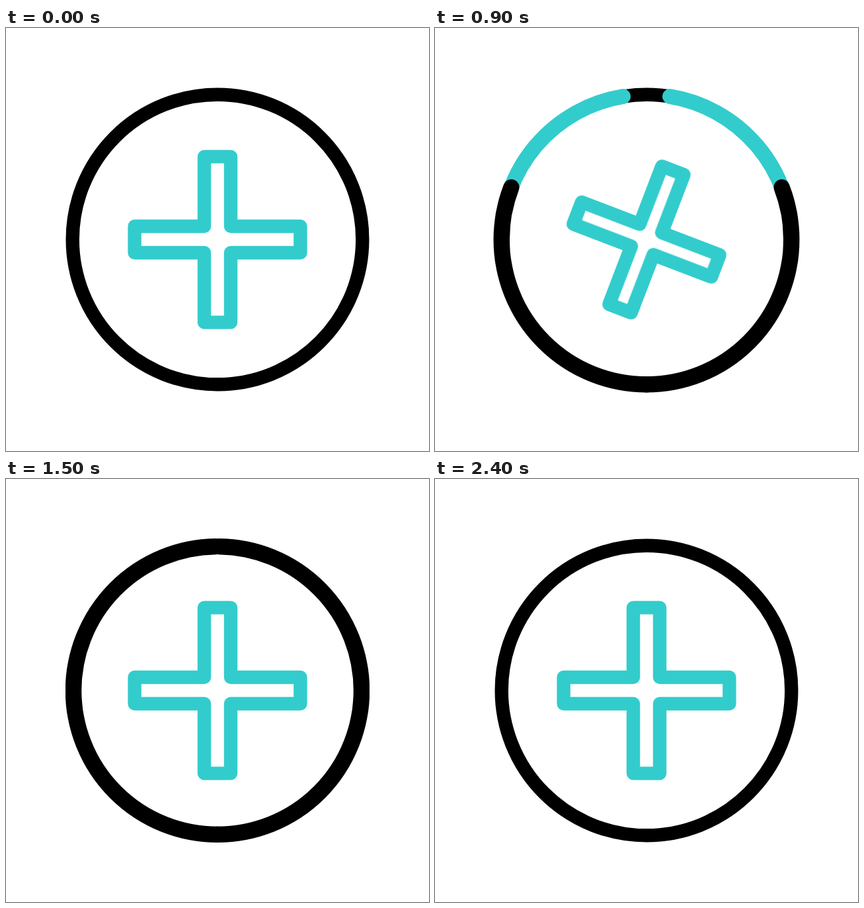
Write an HTML page that moves like this. It is 640 px wide and 640 px high and loops after 2420 ms.

```html
<!DOCTYPE html>
<html lang="en">
<head>
<meta charset="utf-8">
<title>Add</title>
<style>
  html, body { margin: 0; width: 100%; height: 100%; overflow: hidden; background: #fff; }
  svg { display: block; width: 640px; height: 640px; }

  circle, path { fill: none; stroke-linecap: round; stroke-linejoin: round; }
  circle { r: 219.3px; stroke: #000; stroke-width: 20.4; animation: pulse 2420ms infinite; }
  .cyan, .plus { stroke: #33cccc; }

  .cyan {
    stroke-width: 23;
    animation: pulse 2420ms infinite, cyan-grow 2420ms infinite, cyan-show 2420ms step-end infinite;
  }
  .black {
    stroke-width: 24.4;
    animation: pulse 2420ms infinite, black-sweep 2420ms infinite, black-show 2420ms step-end infinite;
  }
  .plus {
    stroke-width: 20.4;
    vector-effect: non-scaling-stroke;
    transform-origin: 0 0;
    animation: bounce 2420ms cubic-bezier(.37, 0, .63, 1) infinite,
               tilt 2420ms cubic-bezier(.37, 0, .63, 1) infinite;
  }

  /* Ring radius: small dip, swell, settle */
  @keyframes pulse {
    0%, 53.7% { r: 219.3px; animation-timing-function: cubic-bezier(.37, 0, .63, 1); }
    59.1% { r: 208.3px; animation-timing-function: cubic-bezier(.25, 0, .25, 1); }
    74.8% { r: 251.8px; animation-timing-function: cubic-bezier(.37, 0, .63, 1); }
    91.2%, 100% { r: 219.3px; }
  }

  /* Half arcs run from the bottom to the top, in degrees */
  @keyframes cyan-grow {
    0%, 2.89% { stroke-dasharray: 0 400; animation-timing-function: cubic-bezier(.333, .667, .667, 1); }
    47.36%, 100% { stroke-dasharray: 180 400; }
  }
  @keyframes cyan-show {
    0% { opacity: 0; }
    2.89% { opacity: 1; }
    61.4%, 100% { opacity: 0; }
  }
  @keyframes black-sweep {
    0%, 22.31% { stroke-dasharray: 0 400; animation-timing-function: cubic-bezier(.333, .667, .667, 1); }
    61.24% { stroke-dasharray: 179.2 400; animation-timing-function: cubic-bezier(.333, 0, .667, 0); }
    97.3%, 100% { stroke-dasharray: 0 400; }
  }
  @keyframes black-show {
    0% { opacity: 0; }
    22.31% { opacity: 1; }
    97.3%, 100% { opacity: 0; }
  }

  @keyframes bounce {
    0% { scale: 1; }
    8.26% { scale: 1.38; }
    28.1% { scale: .785; }
    49.6% { scale: 1.065; }
    57.85%, 100% { scale: 1; }
  }
  @keyframes tilt {
    0%, 4.55% { rotate: 0deg; }
    30.37% { rotate: 25deg; }
    56.2%, 100% { rotate: 0deg; }
  }
</style>
</head>
<body>
<svg viewBox="0 0 640 640">
  <g transform="translate(320 320)">
    <circle/>
    <g transform="rotate(90)">
      <circle class="cyan" pathLength="360"/>
      <circle class="cyan" pathLength="360" transform="scale(1 -1)"/>
      <circle class="black" pathLength="360"/>
      <circle class="black" pathLength="360" transform="scale(1 -1)"/>
    </g>
    <path class="plus" d="M-20-125.4H20V-20H125.4V20H20V125.4H-20V20H-125.4V-20H-20Z"/>
  </g>
</svg>
</body>
</html>
```
